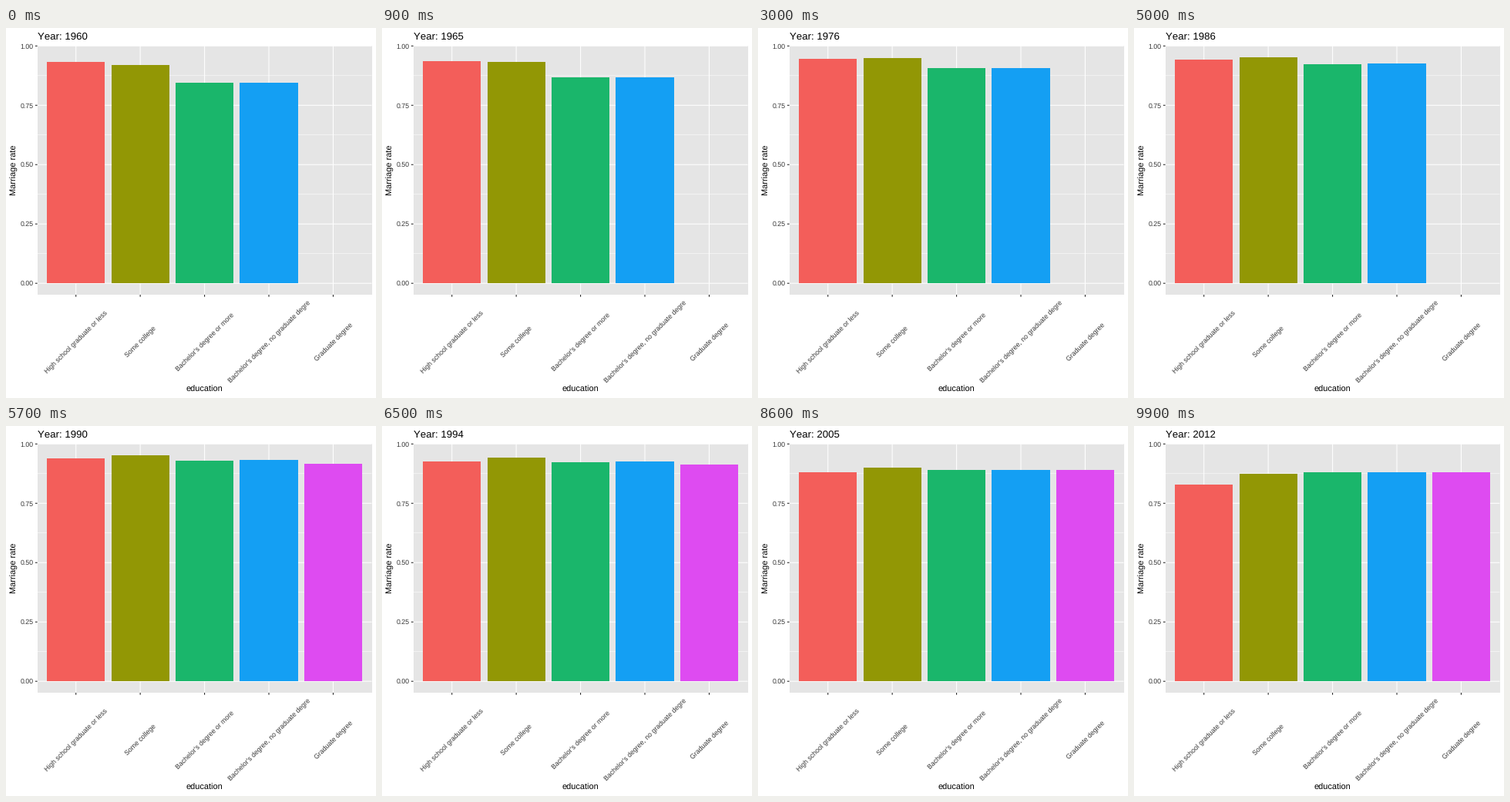
These frames come from a looping animation (480 by 480 pixels, 10000 ms). A matplotlib script:

```python
import numpy as np
import matplotlib.pyplot as plt
from matplotlib.animation import FuncAnimation
from matplotlib.patches import Rectangle

plt.rcParams.update({
    "font.family": "Liberation Sans",
    "text.hinting": "none",
    "text.kerning_factor": 6,
})

SIZE, DPI = 480, 72
FRAMES, INTERVAL = 100, 100
FIRST, TURN, LAST = 1960, 2000, 2012

LEFT, RIGHT, TOP, BOTTOM = 40.65, 474.52, 23, 346
UNIT = (RIGHT - LEFT) / 5.2      # width of one category
ZERO, SCALE = 331.2, 307.9       # pixel row of rate 0, pixels per 1.0
TICK = 2.74
INK, TICK_INK = "#363636", "#262626"

# label, colour, rate per decade up to TURN, rate at LAST, lateness of the decline
BACHELOR = [.845, .8965, .9125]
GROUPS = [
    ("High school graduate or less", "#f35e5a",
     [.932, .9416, .947, .9376, .9095], .828, 2.3),
    ("Some college", "#929705",
     [.919, .945, .952, .951, .929], .8737, 1.5),
    ("Bachelor's degree or more", "#1ab66b",
     BACHELOR + [.929, .911], .880, 1),
    ("Bachelor's degree, no graduate degre", "#149ff3",
     BACHELOR + [.9334, .9124], .880, 1),
    ("Graduate degree", "#de4bf1",
     [.918, .904], .880, 1.5),
]


def row(rate):
    return ZERO - SCALE * rate


def center(i):
    return LEFT + (i + 0.6) * UNIT


def rate_at(year, decades, last, lateness):
    """Linear between decades, then an eased decline from TURN to LAST."""
    if year > TURN:
        u = (year - TURN) / (LAST - TURN)
        return decades[-1] + (last - decades[-1]) * np.sin(u * np.pi / 2) ** lateness
    years = TURN - 10 * np.arange(len(decades))[::-1]
    return np.interp(year, years, decades, left=0)


fig = plt.figure(figsize=(SIZE / DPI, SIZE / DPI), dpi=DPI, facecolor="white")
ax = fig.add_axes([0, 0, 1, 1])
ax.set_xlim(0, SIZE)
ax.set_ylim(SIZE, 0)
ax.axis("off")


def rect(x, y, w, h, color, z):
    patch = Rectangle((x, y), w, h, facecolor=color, linewidth=0, snap=True, zorder=z)
    return ax.add_patch(patch)


def line(xs, ys, color, width=1.07):
    ax.plot(xs, ys, color=color, lw=width, snap=False,
            solid_capstyle="butt", zorder=2)


def text(x, y, s, size, color="black", ha="center", angle=0):
    return ax.text(x, y, s, fontsize=size, color=color, ha=ha, va="baseline",
                   rotation=angle, rotation_mode="anchor")


# Panel, grid and axes
rect(LEFT, TOP, RIGHT - LEFT, BOTTOM - TOP, "#e5e5e5", 1)
for rate in np.arange(0.125, 1, 0.25):
    line([LEFT, RIGHT], [row(rate)] * 2, "white", 0.53)
for rate in np.arange(0, 1.01, 0.25):
    y = row(rate)
    line([LEFT, RIGHT], [y, y], "white")
    line([LEFT - TICK, LEFT], [y, y], TICK_INK)
    text(LEFT - TICK - 2.2, y + 3.15, f"{rate:.2f}", 8.8, INK, "right")

bars = []
for i, (label, color, *_) in enumerate(GROUPS):
    x = center(i)
    line([x, x], [TOP, BOTTOM], "white")
    line([x, x], [BOTTOM, BOTTOM + TICK], TICK_INK)
    text(x + 2.7, 409, label, 8.8, INK, angle=45)
    bars.append(rect(x - 0.45 * UNIT, ZERO, 0.9 * UNIT, 0, color, 3))

text((LEFT + RIGHT) / 2, 472, "education", 11)
text(14, (TOP + BOTTOM) / 2, "Marriage rate", 11, angle=90)
title = text(LEFT, 15.2, "", 13.2, ha="left")


def update(frame):
    year = FIRST + (LAST - FIRST) * frame / (FRAMES - 1)
    title.set_text(f"Year: {round(year)}")
    # a group shows up on the frame nearest to its first year
    half_step = 0.5 * (LAST - FIRST) / (FRAMES - 1)
    for bar, (_, _, decades, last, lateness) in zip(bars, GROUPS):
        start = TURN - 10 * (len(decades) - 1)
        rate = rate_at(max(year, start), decades, last, lateness)
        bar.set_height(-SCALE * rate)
        bar.set_visible(year >= start - half_step)
    return [title, *bars]


anim = FuncAnimation(fig, update, frames=FRAMES, interval=INTERVAL,
                     repeat=True, repeat_delay=0)
plt.show()
```
